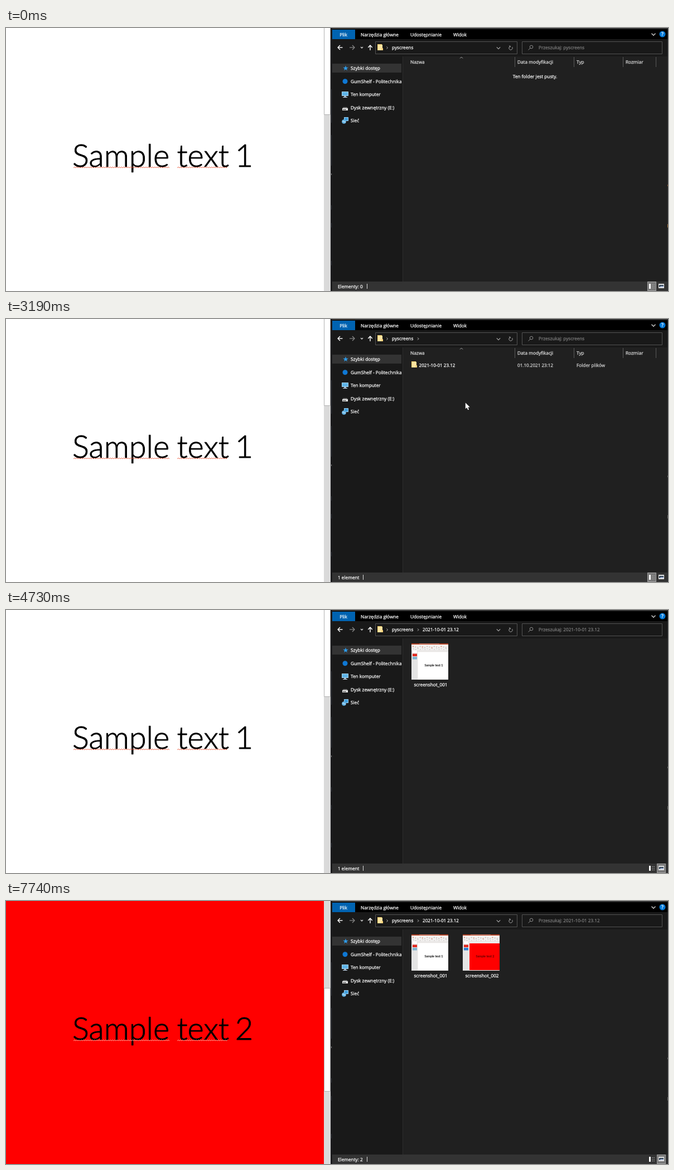
Animation of 1187 by 472 pixels, one loop 8000 ms. Source, as an HTML page with a canvas:

```html
<!DOCTYPE html>
<html lang="pl">
<head>
<meta charset="utf-8">
<title>Zrzuty slajdów</title>
<style>
html, body { margin: 0; width: 100%; height: 100%; overflow: hidden; background: #fff; }
canvas { display: block; }
</style>
</head>
<body>
<canvas id="stage" width="1187" height="472"></canvas>
<script>
const c = document.getElementById('stage').getContext('2d');
const LOOP = 8000, FOLDER = '2021-10-01 23.12';
const UI = '"Open Sans", "Noto Sans", sans-serif';
const HEADING = 'Lato, Carlito, sans-serif';
const T = {
  edge: 710, folder: 2450, count: 2510, crumb: 2780, enter: 2980, click: 3520, release: 3665,
  open: 3790, icon: 3920, oneItem: 3990, thumb: 4050, leave: 4400, gone: 4730, slide: 6210, second: 7740
};
c.textRendering = 'geometricPrecision';
c.lineJoin = 'round';

function box(x, y, w, h, fill, stroke) {
  c.fillStyle = fill;
  c.fillRect(x, y, w, h);
  if (stroke) {
    c.strokeStyle = stroke;
    c.lineWidth = 1;
    c.strokeRect(x + .5, y + .5, w - 1, h - 1);
  }
}

// A fine outline gives the letters the weight of screen-hinted type.
function text(s, x, y, color = '#fff', size = 8.25, align = 'left', font = UI, weight = 400, outline = .25) {
  c.font = `${weight} ${size}px ${font}`;
  c.fillStyle = c.strokeStyle = color;
  c.textAlign = align;
  c.lineWidth = outline;
  c.fillText(s, x, y);
  c.strokeText(s, x, y);
}

function trace(points) {
  c.beginPath();
  for (let i = 0; i < points.length; i += 2) c.lineTo(points[i], points[i + 1]);
}

function line(points, color = '#fff', width = 1.2) {
  trace(points);
  c.strokeStyle = color;
  c.lineWidth = width;
  c.stroke();
}

function poly(points, color) {
  trace(points);
  c.fillStyle = color;
  c.fill();
}

function disc(x, y, r, color) {
  c.beginPath();
  c.arc(x, y, r, 0, 7);
  c.fillStyle = color;
  c.fill();
}

const chevronDown = (x, y, r, color, w) => line([x - r, y - r / 2, x, y + r / 2, x + r, y - r / 2], color, w);
const chevronRight = (x, y) => line([x - 1, y - 2, x + 1, y, x - 1, y + 2], '#ccc', 1);

function folderIcon(x, y) {
  box(x, y, 8, 11, '#f3cc6b');
  box(x + 1, y + 1, 8, 10, '#ffe3a0');
  box(x + 7, y + 7, 3, 4, '#f7d47c');
}

function wave(x0, x1, color) {
  const pts = [];
  for (let x = x0, i = 0; x <= x1; x += 2, i++) pts.push(x, i % 2 ? 249.3 : 251);
  line(pts, color, .9);
}

function slide(t) {
  const second = t >= T.slide;
  box(0, 0, 570, 472, second ? '#f00' : '#fff');
  const word = (s, x, align) => text(s, x, 249, '#000', 56, align, HEADING, 300, .9);
  word('Sample', 119, 'left');
  word('text', 306.5, 'left');
  word(second ? '2' : '1', 427, 'center');
  const ink = second ? '#ffb9a8' : '#ea5a3c';
  wave(121, 294, ink);
  wave(307, 398, ink);

  // The scroll thumb glides to a halt after the slide changes.
  box(570, 0, 12, 472, '#dadada');
  const step = Math.min(3, Math.floor((t - T.slide) / 66));
  const top = second ? [84, 120, 143, 156][step] : -30;
  box(570, top, 12, 186, '#fff', '#b0b0b0');
}

function toolbar(t) {
  box(583, 0, 604, 472, '#191919');
  box(583, 0, 604, 2, '#333');
  box(583, 2, 604, 18, '#000');
  box(585, 3, 41, 17, '#0063b1');
  text('Plik', 605, 15, '#fff', 8.25, 'center');
  text('Narzędzia główne', 636, 15);
  text('Udostępnianie', 725, 15);
  text('Widok', 802, 15);
  chevronDown(1161, 11.5, 3.5, '#ccc', 1.4);
  disc(1177, 11, 5.5, '#0078d7');
  text('?', 1177, 14.3, '#fff', 9, 'center');

  line([603.5, 35, 595, 35], '#fff', 1.4);
  line([599, 31, 595, 35, 599, 39], '#fff', 1.4);
  line([616, 35, 624.5, 35], '#8c8c8c');
  line([621, 31, 625, 35, 621, 39], '#8c8c8c');
  chevronDown(638, 35, 2, '#ddd');
  line([653, 40, 653, 31], '#fff', 1.4);
  line([649.3, 35, 653, 31, 656.7, 35], '#fff', 1.4);

  box(662, 24, 255, 23, '#191919', '#535353');
  box(925, 24, 252, 23, '#191919', '#535353');
  folderIcon(666, 29);
  chevronRight(683.5, 35.5);
  text('pyscreens', 692, 38.3);
  if (t >= T.crumb) chevronRight(739, 35.5);
  const opened = t >= T.open;
  if (opened) text(FOLDER, 747, 38.3, '#fff', 8.1);
  chevronDown(883, 36, 3.2, '#aaa');
  c.beginPath();
  c.arc(905, 36, 3.2, -.6, 4.3);
  c.strokeStyle = '#a5a5a5';
  c.lineWidth = 1;
  c.stroke();
  line([902, 32, 904.5, 32.5, 903.7, 35], '#a5a5a5', 1);
  c.beginPath();
  c.arc(942, 34, 2.8, 0, 7);
  c.strokeStyle = '#8c8c8c';
  c.stroke();
  line([940, 36, 936.5, 39.5], '#8c8c8c', 1);
  text('Przeszukaj: ' + (opened ? FOLDER : 'pyscreens'), 955, 38.3, '#7d7d7d', 8.15);
}

function sidebar() {
  box(585, 64, 124, 16, '#333');
  ['Szybki dostęp', 'GumShelf - Politechnika', 'Ten komputer', 'Dysk zewnętrzny (E:)', 'Sieć']
    .forEach((s, i) => text(s, 618, 75 + i * 23.5));
  const star = [];
  for (let i = 0; i < 10; i++) {
    const r = i % 2 ? 2 : 5, a = i * Math.PI / 5 - Math.PI / 2;
    star.push(609 + r * Math.cos(a), 72.3 + r * Math.sin(a));
  }
  poly(star, '#2f9be8');
  disc(608, 95.8, 4.5, '#0f78d4');
  box(602, 114, 12, 8, '#5eb4e8', '#a9d3ec');
  box(606, 122, 4, 2, '#9ab');
  box(604, 124, 8, 1, '#bcd');
  poly([605, 142, 611, 142, 613, 144, 603, 144], '#777');
  box(603, 144, 10, 4, '#e6e6e6');
  box(604, 146, 6, 1, '#333');
  box(606, 160, 8, 7, '#3f9ddb', '#9fd0ee');
  disc(606, 168, 3.8, '#66b5e6');
  line([603, 167, 609, 169], '#d7eefa', 1);
}

function listView(t, pos) {
  [912, 1018, 1106, 1165].forEach(x => box(x, 52, 1, 18, '#5a5a5a'));
  line([814, 54.5, 816.5, 52, 819, 54.5], '#aaa', 1);
  text('Nazwa', 725, 64, '#dedede');
  text('Data modyfikacji', 917, 64, '#dedede');
  text('Typ', 1023, 64, '#dedede');
  text('Rozmiar', 1111, 64, '#dedede');
  if (t < T.folder) {
    text('Ten folder jest pusty.', 948.5, 89.5, '#fff', 8.25, 'center');
    return;
  }
  if (t >= T.click) box(723, 75, 440, 15, '#777', '#8c8c8c');
  else if (pos && pos[1] > 74 && pos[1] < 90) box(723, 75, 440, 15, '#4d4d4d');
  folderIcon(727, 76);
  text(FOLDER, 740.5, 85.5, '#fff', 8.1);
  text('01.10.2021 23:12', 917, 85.5, '#d2d2d2', 8.1);
  text('Folder plików', 1023, 85.5, '#d2d2d2');
}

function thumbnail(x, n) {
  const red = n === 2;
  box(x, 60, 66, 65, '#f5f3f2');
  box(x, 60, 66, 2, '#b7472a');
  box(x + 14, 60, 36, 1, '#d58a75');
  for (let i = 0; i < 15; i++) {
    box(x + 2 + i * 4.2, 64.5 + i % 3, 2, 2, i % 4 ? '#c9c5c3' : '#d69886');
    box(x + 2 + i * 4.2, 69 + i % 2, 2.6, 1.4, '#d2cfcd');
  }
  box(x, 73, 66, 1, '#d8d5d3');
  box(x, 74, 11, 51, '#e4e4e4');
  ['#fff', '#e02a20', red ? '#2f7fd0' : '#7fb4cf'].forEach((f, i) => box(x + 2, 73 + i * 5.5, 8, 4.5, f));
  box(x + 12, 76, 54, 48, red ? '#f00' : '#fff');
  text('Sample text ' + n, x + 40, 101, red ? '#7a0000' : '#333', 5.5, 'center', HEADING);
  text('screenshot_00' + n, x + 34.5, 136.5, '#fff', 8.25, 'center');
}

function iconView(t) {
  if (t >= T.thumb) thumbnail(727, 1);
  else if (t >= T.icon) {
    poly([738, 62, 771, 62, 784, 75, 784, 123.5, 738, 123.5], '#f4f4f4');
    poly([771, 62, 784, 75, 771, 75], '#cfcfcf');
    box(746, 79, 30, 30, '#1f80cc');
    text('screenshot_001', 761.5, 136.5, '#fff', 8.25, 'center');
  }
  if (t >= T.second) thumbnail(819, 2);
}

function statusBar(t) {
  box(585, 455, 602, 17, '#333');
  const one = (t >= T.count && t < T.open) || (t >= T.oneItem && t < T.second);
  text(one ? '1 element' : 'Elementy: ' + (t >= T.second ? 2 : 0), 595, 467);
  box(one ? 640 : 647, 459, 1, 9, '#ddd');
  if (t >= T.click && t < T.open) {
    text('1 zaznaczony element', 648.5, 467);
    box(740, 459, 1, 9, '#ddd');
  }
  box(t >= T.open ? 1167 : 1150, 455, 16, 17, '#777', '#a0a0a0');
  box(1153, 459, 3, 9, '#fff');
  for (let y = 460; y < 468; y += 3) {
    box(1158, y, 2, 1, '#999');
    box(1161, y, 2, 1, '#999');
  }
  box(1170, 459, 10, 8, '#e8e8e8');
  box(1171, 461, 8, 4, '#345');
  box(1173, 463, 6, 2, '#9ac');
}

function cursorAt(t) {
  if (t < T.enter || t >= T.gone) return null;
  let p = 0;
  if (t < T.leave) {
    const k = Math.floor((t - T.enter) / 68) + 1;
    p = (1 - Math.min(1, k / 6)) ** 1.5;
  } else {
    p = ((Math.floor((t - T.leave) / 66) + 1) / 5) ** 1.3;
  }
  return [803 + 108 * p, 84 + 344 * p];
}

function cursor([x, y], pressed) {
  if (pressed) disc(x - .5, y - .5, 9, 'rgba(205,188,20,.85)');
  const shape = [0, 0, 0, 11, 2.6, 8.8, 4.5, 13, 6.3, 12.2, 4.5, 8.2, 8, 8, 0, 0];
  const points = shape.map((v, i) => v + (i % 2 ? y : x));
  line(points, '#111', 1);
  poly(points, '#fff');
}

function edges(t) {
  box(582, 0, 3, 472, '#1b1b1d');
  [[110, 60], [192, 55], [318, 8], [350, 8], [418, 8]].forEach(([y, h]) => box(583, y, 1, h, '#34373f'));
  box(583, 261, 1, 3, '#888');
  box(1186, 0, 1, 472, '#25272b');
  const lit = t < T.edge;
  box(1186, 281, 1, 3, lit ? '#8a5a34' : '#666');
  box(1186, 352, 1, 6, lit ? '#a8743c' : '#666');
}

function draw() {
  const t = performance.now() % LOOP, pos = cursorAt(t);
  slide(t);
  toolbar(t);
  sidebar();
  box(711, 51, 476, 404, '#202020');
  box(711, 51, 1, 404, '#2d2d2d');
  if (t < T.open) listView(t, pos);
  else iconView(t);
  statusBar(t);
  edges(t);
  if (pos) cursor(pos, t >= T.click && t < T.release);
  requestAnimationFrame(draw);
}
draw();
</script>
</body>
</html>
```
